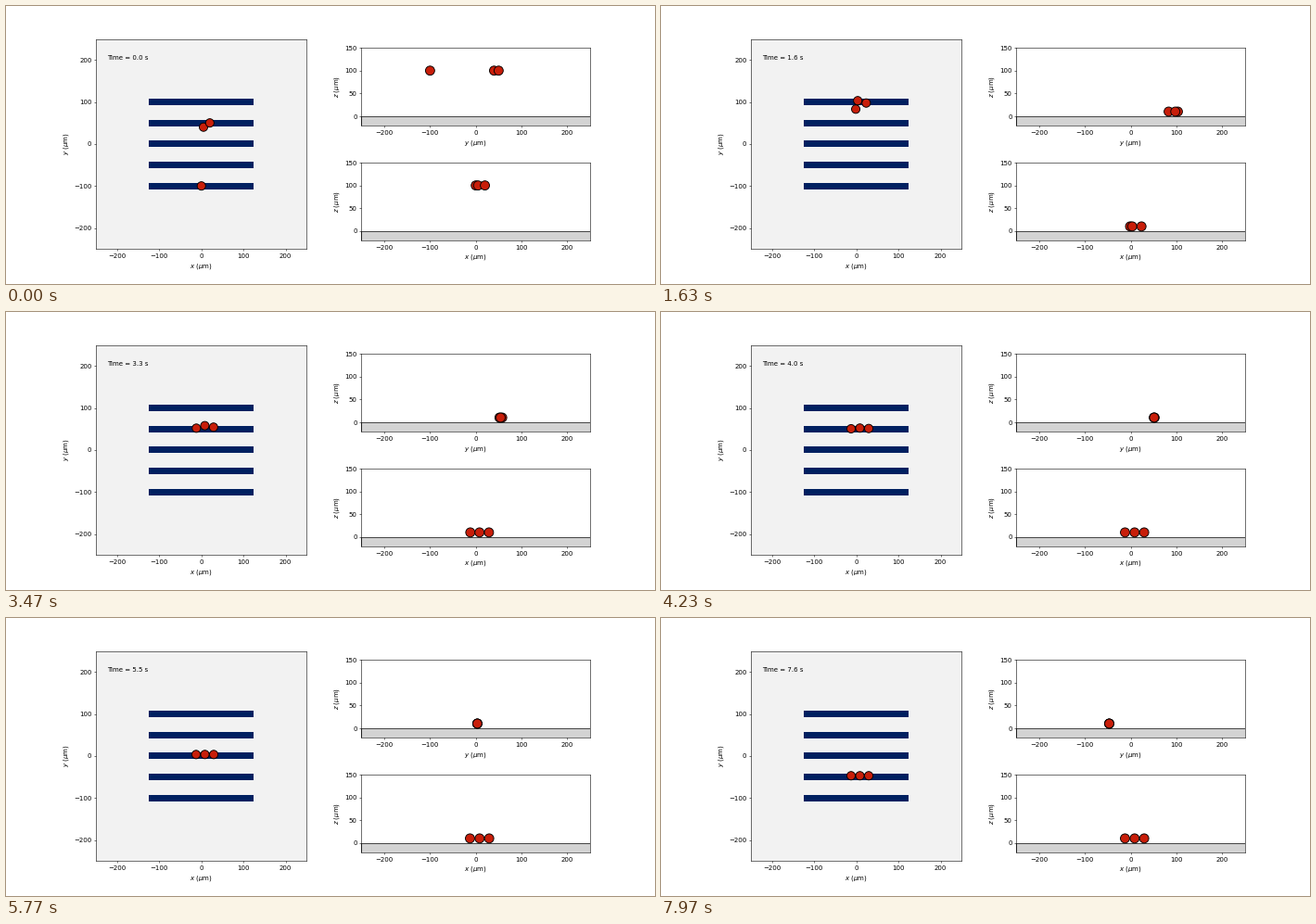
A matplotlib script for the animation above (8000 ms loop, 700x300 px).

```python
import numpy as np
import matplotlib.pyplot as plt
from matplotlib.animation import FuncAnimation
from matplotlib.patches import Circle, Rectangle

W, H, DPI = 700, 300, 50
TICKS, TICK_MS = 400, 20   # 8 s loop
STEPS = 240                # simulated states, three per five ticks
DT = 0.0318                # simulated seconds per state
SUBSTEPS = 20
PULL = 1.865               # attraction rate towards the active bar
PUSH = 60.0                # contact stiffness
GAP = 21.0                 # contact distance between beads
FLOOR = 10.3
RADIUS = 10
BARS = (100, 50, 0, -50, -100)

PAPER, PANEL, GROUND = "white", "#f2f2f2", "lightgrey"
NAVY, RED = "#002060", "#c81e0a"


def active_bar(t):
    return BARS[max(0, int((t - 0.055) // 2))]


def simulate():
    """Overdamped beads drawn to one bar at a time, pushing each other apart."""
    pos = np.array([[0, -100, 100], [5, 40, 100], [20, 50, 100]], float)
    h = DT / SUBSTEPS
    path = []
    for n in range(STEPS):
        path.append(pos.copy())
        for s in range(SUBSTEPS):
            vel = np.zeros_like(pos)
            vel[:, 1] = PULL * (active_bar(n * DT + s * h) - pos[:, 1])
            vel[:, 2] = -PULL * pos[:, 2]
            for i in range(3):
                for j in range(i):
                    d = pos[i] - pos[j]
                    r = np.linalg.norm(d)
                    if r < GAP:
                        f = PUSH * (GAP - r) * d / r
                        vel[i] += f
                        vel[j] -= f
            pos = pos + h * vel
            pos[:, 2] = np.maximum(pos[:, 2], FLOOR)
    return np.array(path)


def add_panel(x0, y0, x1, y1, xlabel, ylabel, ylim, face):
    """Axes from pixel corners measured from the top left."""
    ax = fig.add_axes([x0 / W, 1 - y1 / H, (x1 - x0) / W, (y1 - y0) / H],
                      facecolor=face)
    ax.set(xlim=(-250, 250), ylim=ylim)
    ax.set_xlabel(rf"${xlabel}$ ($\mu$m)")
    ax.set_ylabel(rf"${ylabel}$ ($\mu$m)")
    ax.set_xticks(range(-200, 201, 100))
    return ax


def add_beads(ax):
    return [ax.add_patch(Circle((0, 0), RADIUS, fc=RED, ec="black", lw=1.3,
                                zorder=3 + 0.1 * i)) for i in range(3)]


fig = plt.figure(figsize=(W / DPI, H / DPI), dpi=DPI, facecolor=PAPER)
top = add_panel(97.3, 35.52, 324.2, 262.18, "x", "y", (-250, 250), PANEL)
side = add_panel(383.4, 45.1, 630, 128.9, "y", "z", (-20, 150), PAPER)
front = add_panel(383.4, 169, 630, 252.8, "x", "z", (-20, 150), PAPER)

top.set_yticks(range(-200, 201, 100))
for y in BARS:
    top.add_patch(Rectangle((-125, y - 7.5), 250, 15, fc=NAVY, lw=0))
for ax in (side, front):
    ax.set_yticks(range(0, 151, 50))
    ax.add_patch(Rectangle((-250, -20), 500, 20, fc=GROUND, ec="black", lw=1))

clock = top.text(-225, 200, "")
views = [(add_beads(top), (0, 1)), (add_beads(side), (1, 2)),
         (add_beads(front), (0, 2))]
path = simulate()


def draw(tick):
    n = (3 * tick + 2) // 5
    clock.set_text(f"Time = {n * DT:.1f} s")
    for beads, dims in views:
        for bead, p in zip(beads, path[n]):
            bead.center = p[dims[0]], p[dims[1]]
    return [clock] + [b for beads, _ in views for b in beads]


anim = FuncAnimation(fig, draw, frames=TICKS, interval=TICK_MS,
                     repeat=True, repeat_delay=0)
plt.show()
```
